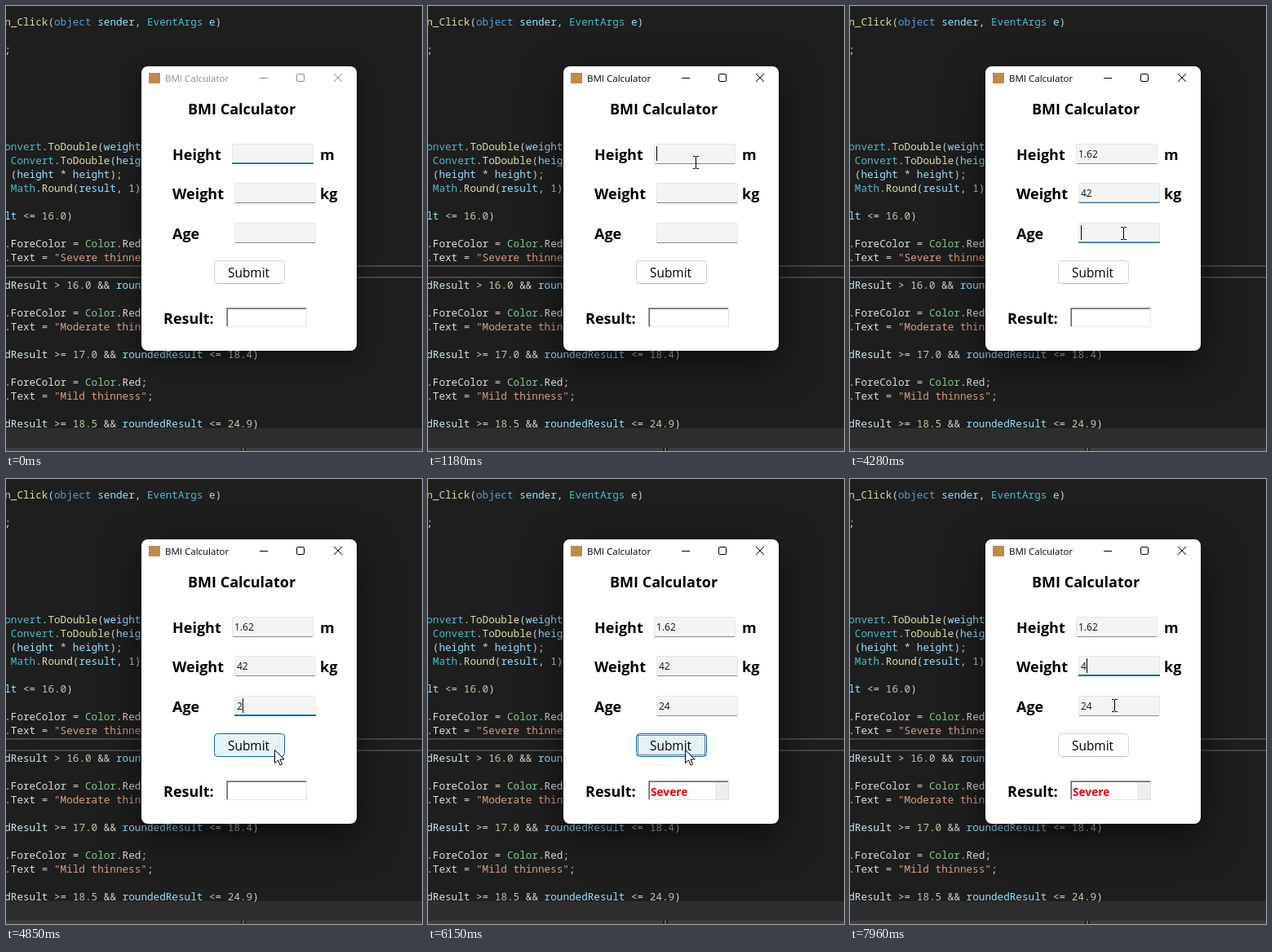
Recreate the animation shown at these times as an HTML page with a canvas. Size 510 px wide and 546 px high, loop 8 s.

```html
<!DOCTYPE html>
<html lang="en">
<head>
<meta charset="utf-8">
<title>BMI Calculator</title>
<style>
  html, body { margin: 0; width: 100%; height: 100%; overflow: hidden; background: #1e1e1e; }
  canvas { display: block; }
</style>
</head>
<body>
<canvas id="stage" width="510" height="546"></canvas>
<script>
const ctx = document.getElementById('stage').getContext('2d');
const LOOP = 8000;
const SANS = '"Open Sans", "Noto Sans", sans-serif';
const MONO = '500 12.67px "Noto Sans Mono", "DejaVu Sans Mono", monospace';
const BLUE = '#0067c0';

// Row number -> visible code text
const CODE = {
  0: 'n_Click(object sender, EventArgs e)',
  2: ';',
  9: 'onvert.ToDouble(weight',
  10: ' Convert.ToDouble(heig',
  11: ' (height * height);',
  12: ' Math.Round(result, 1)',
  14: 'lt <= 16.0)',
  16: '.ForeColor = Color.Red;',
  17: '.Text = "Severe thinness";',
  19: 'dResult > 16.0 && roun',
  21: '.ForeColor = Color.Red;',
  22: '.Text = "Moderate thin',
  24: 'dResult >= 17.0 && roundedResult <= 18.4)',
  26: '.ForeColor = Color.Red;',
  27: '.Text = "Mild thinness";',
  29: 'dResult >= 18.5 && roundedResult <= 24.9)',
};
const WORD_COLORS = {
  object: '#569cd6', EventArgs: '#4fb9c8', Convert: '#4fb9c8', onvert: '#4fb9c8', Math: '#4fb9c8',
  Color: '#86c691', n_Click: '#dcdcaa', ToDouble: '#dcdcaa', Round: '#dcdcaa',
  ForeColor: '#dcdcdc', Text: '#dcdcdc', Red: '#dcdcdc',
};

// Typed values as [time, text]; focus spans as [start, end]; carets as [on, off]
const FIELDS = [
  { x: 277, y: 169, focus: [[-900, -40], [1200, 2400]], carets: [[1000, 2400]],
    typed: [[1450, '1'], [1930, '1.'], [2000, '1.6'], [2070, '1.62']] },
  { x: 280, y: 217, focus: [[2400, 4160], [7190, 9000]], carets: [[2540, 3070], [3200, 4160], [7750, 8000]],
    typed: [[3200, '4'], [3270, '42'], [7750, '4']] },
  { x: 280, y: 266, focus: [[4160, 5900]], carets: [[4160, 4650], [4850, 5530]],
    typed: [[4850, '2'], [5060, '24']] },
];

// Pointer path as [time, x, y]
const PATH = [
  [70, 458, 446], [830, 328, 192], [3330, 328, 192], [3340, 378, 238], [3600, 378, 238],
  [4020, 335, 279], [4400, 335, 279], [4700, 329, 332], [5530, 329, 332], [5600, 315, 332],
  [6420, 315, 332], [6700, 326, 237], [6840, 326, 237], [6980, 308, 238], [7190, 308, 238],
  [7400, 223, 238], [7700, 223, 238], [7960, 324, 278],
];
const POINTER_SPANS = [[70, 1400], [3340, 4990], [5530, 8000]];

const clamp = v => Math.max(0, Math.min(1, v));
const during = (t, spans) => spans.some(([a, b]) => t >= a && t < b);
const inside = (p, x, y, w, h) => p.x >= x && p.x <= x + w && p.y >= y && p.y <= y + h;

function rect(x, y, w, h, color) {
  ctx.fillStyle = color;
  ctx.fillRect(x, y, w, h);
}

function rounded(x, y, w, h, r, fill, stroke) {
  ctx.beginPath();
  ctx.roundRect(x, y, w, h, r);
  if (fill) { ctx.fillStyle = fill; ctx.fill(); }
  if (stroke) { ctx.strokeStyle = stroke; ctx.stroke(); }
}

function text(str, x, y, size, color = '#000', weight = 400) {
  ctx.font = `${weight} ${size}px ${SANS}`;
  ctx.fillStyle = color;
  ctx.fillText(str, x, y);
}

function lines(color, ...polylines) {
  ctx.strokeStyle = color;
  ctx.beginPath();
  for (const points of polylines)
    points.forEach(([x, y], i) => i ? ctx.lineTo(x, y) : ctx.moveTo(x, y));
  ctx.stroke();
}

function pointerAt(t) {
  const next = PATH.findIndex(k => k[0] > t);
  const b = PATH[next < 0 ? PATH.length - 1 : next];
  const a = PATH[Math.max(0, (next < 0 ? PATH.length : next) - 1)];
  const u = b === a ? 1 : clamp((t - a[0]) / (b[0] - a[0]));
  const e = u * u * (3 - 2 * u);
  return { x: a[1] + (b[1] - a[1]) * e, y: a[2] + (b[2] - a[2]) * e };
}

function tokenColor(token) {
  if (token[0] === '"') return '#d69d85';
  if (/^\d/.test(token)) return '#b5cea8';
  if (/^\w/.test(token)) return WORD_COLORS[token] || (token === 'dResult' ? '#d0e4ee' : '#9cdcfe');
  return '#d0d0d0';
}

function drawEditor() {
  rect(0, 0, 510, 546, '#1e1e1e');
  rect(0, 318, 510, 2, '#464646');
  rect(0, 332, 510, 2, '#464646');
  rect(0, 518, 510, 24, '#2d2d2d');
  rect(0, 542, 510, 4, '#3e3e40');
  rect(288, 542, 6, 4, '#1e1e1e');
  rect(290, 542, 2, 4, '#686868');
  ctx.font = MONO;
  for (const [row, line] of Object.entries(CODE))
    for (const m of line.matchAll(/"[^"]*"?|[A-Za-z_]\w*|\d+(\.\d+)?|[^\w"]+/g)) {
      ctx.fillStyle = tokenColor(m[0]);
      ctx.fillText(m[0], -1.8 + m.index * 7.6, 24 + row * 17);
    }
}

function drawWindow(t) {
  const active = clamp((t - 900) / 200);
  ctx.save();
  ctx.shadowColor = `rgba(0,0,0,${0.45 + 0.15 * active})`;
  ctx.shadowBlur = 24 + 24 * active;
  ctx.shadowOffsetY = 8 + 8 * active;
  rounded(166, 74, 264, 349, 8, '#fff');
  ctx.restore();

  const shade = Math.round(140 * (1 - active));
  const ink = `rgb(${shade},${shade},${shade})`;
  rect(175, 82, 14, 13, '#c08a4a');
  text('BMI Calculator', 195, 93, 11.5, ink);
  lines(ink, [[311, 88.5], [321, 88.5]], [[402, 83], [412, 93]], [[412, 83], [402, 93]]);
  rounded(356.5, 83.5, 9, 9, 1.5, null, ink);

  const labels = [['BMI Calculator', 223, 133], ['Height', 204, 189], ['m', 385, 189], ['Weight', 204, 237],
    ['kg', 385, 237], ['Age', 204, 286], ['Result:', 193, 390]];
  for (const [str, x, y] of labels) text(str, x, y, 18, '#000', 700);
}

function drawField(field, t) {
  const { x, y } = field;
  const value = field.typed.reduce((last, [at, str]) => t >= at ? str : last, '');
  const glow = field.focus.reduce((sum, [a, b]) => sum + clamp((t - a) / 200) - clamp((t - b) / 200), 0);
  rounded(x + 0.5, y + 0.5, 99, 24, 1, '#f4f4f4', '#e6e6e6');
  rect(x + 1, y + 24, 98, 1, '#868686');
  if (glow > 0) {
    ctx.globalAlpha = glow;
    rect(x, y + 23, 100, 2, BLUE);
    ctx.globalAlpha = 1;
  }
  ctx.font = `400 12px ${SANS}`;
  const width = ctx.measureText(value).width;
  const selected = field === FIELDS[1] && t >= 7300 && t < 7750;
  if (selected) rect(x + 3, y + 4, width, 17, '#0078d7');
  text(value, x + 3, y + 17, 12, selected ? '#fff' : '#111');
  if (during(t, field.carets)) rect(Math.round(x + 3 + width), y + 3, 1, 18, '#000');
}

function drawButton(t, pointer) {
  const hover = inside(pointer, 255, 312, 87, 29);
  const focused = t >= 5900 && t < 7190;
  const pressed = t >= 5900 && t < 6050;
  const fill = pressed ? '#cce4f7' : hover ? '#e5f1fb' : '#fdfdfd';
  rounded(255.5, 312.5, 86, 28, 4, fill, hover || focused ? BLUE : '#d0d0d0');
  if (!hover && !focused) rect(259, 340, 79, 1, '#b8b8b8');
  if (focused) {
    if (!hover) rounded(256.5, 313.5, 84, 26, 3, null, '#4a9ad8');
    ctx.setLineDash([1, 1]);
    ctx.strokeStyle = '#000';
    ctx.strokeRect(257.5, 314.5, 82, 24);
    ctx.setLineDash([]);
  }
  text('Submit', 272, 333, 15.4);
}

function drawResult(t) {
  rect(270, 370, 99, 24, '#e3e3e3');
  rect(270, 370, 98, 23, '#a0a0a0');
  rect(271, 371, 97, 22, '#696969');
  rect(272, 372, 96, 21, '#fff');
  if (t >= 6150) {
    rect(352, 372, 16, 21, '#eeeeee');
    text('Severe', 273, 389, 13.7, '#e8000b', 700);
  }
}

function drawPointer(t, { x, y }) {
  const p = { x, y };
  const beam = !inside(p, 166, 74, 264, 349) || (t >= 7190 && t < 7700) ||
    FIELDS.some(f => inside(p, f.x, f.y, 100, 25));
  ctx.save();
  ctx.translate(Math.round(x), Math.round(y));
  if (beam) {
    const overCode = !inside(p, 166, 74, 264, 349);
    lines(overCode ? '#fff' : '#000', [[0.5, -7], [0.5, 7]],
      [[-3, -7.5], [0, -7.5]], [[1, -7.5], [4, -7.5]], [[-3, 7.5], [0, 7.5]], [[1, 7.5], [4, 7.5]]);
  } else {
    ctx.fillStyle = '#fff';
    ctx.strokeStyle = '#000';
    ctx.beginPath();
    for (const [px, py] of [[0, 0], [0, 16], [4, 12.5], [6.5, 18.5], [9, 17.5], [6.5, 11.5], [11.5, 11.5]])
      ctx.lineTo(px + 0.5, py + 0.5);
    ctx.closePath();
    ctx.fill();
    ctx.stroke();
  }
  ctx.restore();
}

function frame(now) {
  const t = now % LOOP;
  const pointer = pointerAt(t);
  drawEditor();
  drawWindow(t);
  FIELDS.forEach(field => drawField(field, t));
  drawButton(t, pointer);
  drawResult(t);
  if (during(t, POINTER_SPANS)) drawPointer(t, pointer);
  requestAnimationFrame(() => frame(performance.now() - start));
}

const start = performance.now();
frame(0);
</script>
</body>
</html>
```
